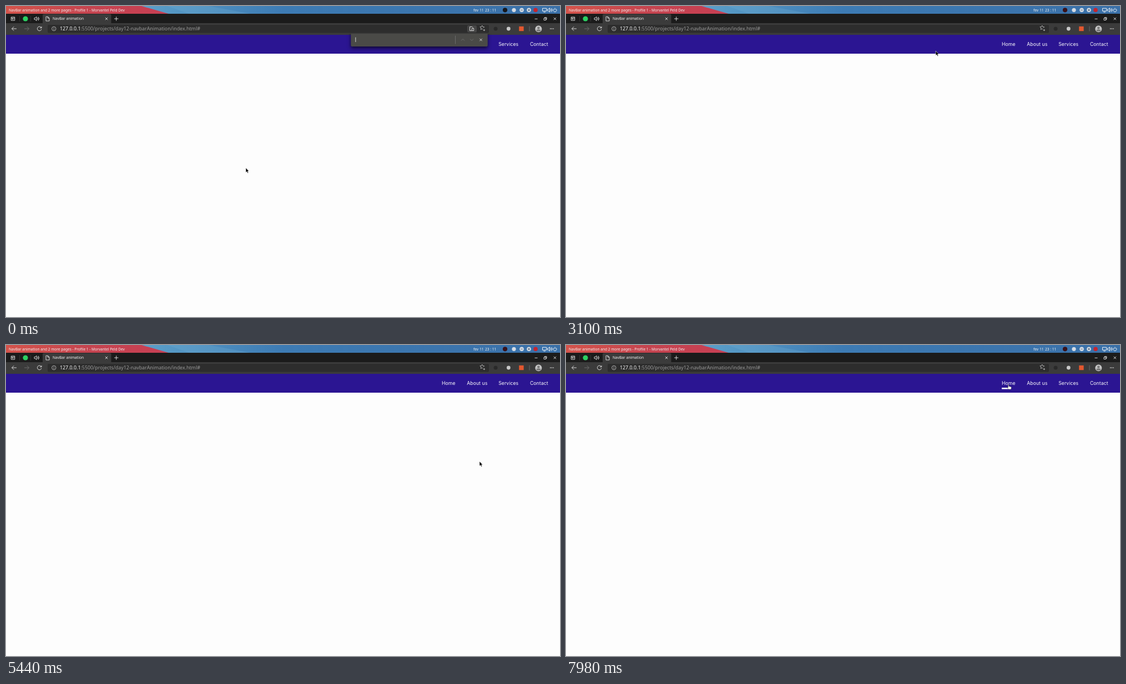
Animation of 998 by 561 pixels, one loop 8 s. Source, as an HTML page:

```html
<!DOCTYPE html>
<html lang="en">
<head>
<meta charset="utf-8">
<title>NavBar animation</title>
<style>
  html, body { margin: 0; width: 100%; height: 100%; overflow: hidden; background: #fdfdfd; }
  svg { display: block; width: 100vw; height: 100vh; }
  text { font: 6.6px "Noto Sans", sans-serif; fill: #f2f2f2; white-space: pre; }
  .url { font-size: 8.85px; fill: #9a9a9a; }
  .nav text { font: 8.6px Inter, sans-serif; letter-spacing: .1px; fill: #fff; text-anchor: middle; }
  .line { fill: none; stroke: #e6e6e6; stroke-width: .9; }
  .soft { stroke: #bbb; }
  .dim { stroke: #707070; }

  /* every part shares one 8 s loop */
  .pointer, .arrow, .hand, .underline, .find-bar, .find-button, .recorder {
    animation: 8s linear infinite;
  }
  .pointer { animation-name: wander; animation-timing-function: ease-in-out; }
  .arrow { animation-name: leave-page; animation-timing-function: step-end; }
  .hand { animation-name: reach-link; animation-timing-function: step-end; }
  .underline { animation-name: grow; }
  .find-bar { animation-name: close; filter: drop-shadow(0 3px 3px #000a); }
  .find-button { animation-name: vanish; animation-timing-function: step-end; }
  .recorder { animation-name: record; animation-timing-function: step-end; }

  @keyframes wander {
    0%, 21% { transform: translate(432px, 292px); animation-timing-function: ease-in; }
    24% { transform: translate(600px, 335px); animation-timing-function: linear; }
    27.75% { transform: translate(799px, 259px); animation-timing-function: ease-out; }
    31.5% { transform: translate(918px, 120px); }
    38.75%, 40% { transform: translate(666px, 81px); }
    48% { transform: translate(940px, 198px); }
    55.75% { transform: translate(718px, 88px); }
    63% { transform: translate(921px, 232px); }
    68% { transform: translate(853px, 210px); }
    73% { transform: translate(894px, 179px); }
    80.75%, 82.25% { transform: translate(804px, 117px); }
    99.75%, 100% { transform: translate(797px, 71px); }
  }
  @keyframes leave-page { 0% { opacity: 1; } 97%, 100% { opacity: 0; } }
  @keyframes reach-link { 0% { opacity: 0; } 97%, 100% { opacity: 1; } }
  @keyframes grow { 0%, 97% { width: 0; } 100% { width: 18px; } }
  @keyframes close {
    0%, .75% { transform: none; animation-timing-function: ease-in; }
    3.25%, 100% { transform: translateY(-50px); }
  }
  @keyframes vanish { 0% { opacity: 1; } 3.25%, 100% { opacity: 0; } }
  @keyframes record { 0% { fill: #17171b; } 3.75%, 100% { fill: #3b1218; } }
</style>
</head>
<body>
<svg viewBox="0 0 998 561" preserveAspectRatio="none">
  <defs>
    <linearGradient id="sky">
      <stop offset=".25" stop-color="#5b9fc9"/>
      <stop offset=".5" stop-color="#3d7bb4"/>
      <stop offset="1" stop-color="#3a70a8"/>
    </linearGradient>
    <linearGradient id="coral">
      <stop stop-color="#d4534b"/>
      <stop offset=".5" stop-color="#c5444f"/>
      <stop offset="1" stop-color="#c83f54"/>
    </linearGradient>
    <clipPath id="below"><rect x="600" y="50" width="300" height="50"/></clipPath>
    <path id="cross" d="M-2.2-2.2l4.4 4.4m0-4.4l-4.4 4.4"/>
    <path id="speaker" d="M-4-1.5h1.7L0-3.6v7.2l-2.3-2.1H-4zM1.8-2q1.6 2 0 4M3.2-3.3q2.8 3.3 0 6.6"/>
    <path id="shaft" d="M4.3 0h-8.5m3.7-3.7L-4.2 0l3.7 3.7"/>
    <path id="chevron" d="M-3 1.5l3-3 3 3"/>
  </defs>

  <!-- page navigation -->
  <rect y="52" width="998" height="34" fill="#2b1592"/>
  <g class="nav">
    <text x="797.3" y="72">Home</text>
    <text x="848.8" y="72">About us</text>
    <text x="905.2" y="72">Services</text>
    <text x="960.3" y="72">Contact</text>
  </g>
  <rect class="underline" x="785" y="77" height="2.6" fill="#fff"/>

  <!-- desktop panel -->
  <rect width="998" height="14" fill="url(#sky)"/>
  <path d="M290 0h75l75 14H330Z" fill="#75afd1" opacity=".25"/>
  <path d="M0 0H244L293 14H0Z" fill="url(#coral)"/>
  <text x="5" y="9.6" style="font-size:6.55px">NavBar animation and 2 more pages - Profile 1 - Morvantel Peld Dev</text>
  <text x="842" y="9.8">fev 11</text>
  <text x="863" y="9.8">23 : 11</text>
  <circle class="recorder" cx="899" cy="7.3" r="4.1"/>
  <g fill="#d5dce4">
    <circle cx="915" cy="7.3" r="3.6"/>
    <circle cx="929" cy="7.3" r="3.8"/>
    <circle cx="942" cy="7.3" r="3.8"/>
    <circle cx="954" cy="7.3" r="3.8" fill="#c6252f"/>
  </g>
  <path d="M927 7.3h4" stroke="#64798f"/>
  <rect x="940.5" y="5.8" width="3" height="3" fill="#64798f"/>
  <g class="line" style="stroke:#fff">
    <path d="M966.5 4.2h7v5h-7zM968.3 11h3.4"/>
    <use href="#speaker" x="979.5" y="7.3"/>
    <path d="M987.2 5a3 3 0 1 0 3.4 0M988.9 3.6v3.4"/>
  </g>

  <!-- tab strip -->
  <rect y="14" width="998" height="17" fill="#1b1b1b"/>
  <rect x="66" y="14.5" width="123.5" height="20" rx="2.5" fill="#3b3b3b"/>
  <path d="M24.5 18v10M44.5 18v10" stroke="#444" stroke-width=".6"/>
  <circle cx="35" cy="23" r="4.6" fill="#2bcf62"/>
  <text x="84" y="25.4">NavBar animation</text>
  <g class="line">
    <path d="M9.3 20h6.4v6H9.3zM9.3 22h6.4M11.5 22v2h2"/>
    <use href="#speaker" x="55" y="23"/>
    <path d="M72 19.3h3.5l2.5 2.5v5.2h-6zM75.3 19.3v2.7H78"/>
    <use href="#cross" x="181" y="23"/>
    <path d="M195 23h7.4m-3.7-3.7v7.4"/>
    <path d="M952.5 23.3h5M969 22h3.7v3.5H969zM970.3 22v-1.3h3.6v3.5h-1.2"/>
    <use href="#cross" x="988.8" y="23"/>
  </g>

  <!-- toolbar -->
  <rect y="31" width="998" height="21" fill="#3b3b3b"/>
  <rect x="75" y="34" width="795" height="14.5" rx="2" fill="#2d2d2d"/>
  <text class="url" x="97" y="44.2"><tspan fill="#f4f4f4">127.0.0.1</tspan>:5500/projects/day12-navbarAnimation/index.html#</text>
  <g class="line">
    <use href="#shaft" x="14.7" y="41"/>
    <use href="#shaft" class="dim" transform="translate(37.3 41) scale(-1 1)"/>
    <path d="M63.6 39.2a3.8 3.8 0 1 0 .3 2.6M64 37v2.6h-2.7"/>
    <g class="soft">
      <circle cx="86.3" cy="41" r="3.7"/>
      <path d="M86.3 40.4v2.8M86.3 38.5v1"/>
      <path d="M859 42l-1.3-.8-2.4 1.2.5-2.8-2-1.8 2.6-.3 1.3-2.4 1.2 2.4 2.7.4-1.7 1.7M859.5 43.5h3.6m-1.8-1.8v3.6"/>
    </g>
    <path class="dim" d="M943 36.5v9"/>
  </g>
  <circle cx="882" cy="41" r="3.5" fill="#292929"/>
  <circle cx="905.3" cy="41" r="3.4" fill="#c9c9c9"/>
  <rect x="924.2" y="36.8" width="8.4" height="8.4" fill="#e2572f"/>
  <circle cx="959.3" cy="41.3" r="6" fill="#c4c4c4"/>
  <circle cx="959.3" cy="39.6" r="2.2" fill="#777"/>
  <ellipse cx="959.3" cy="44" rx="4" ry="1.8" fill="#777"/>
  <path d="M980 41h7" class="line" stroke-dasharray="1.3 1.4" style="stroke-width:1.3"/>

  <!-- find bar and its toolbar button -->
  <g class="find-button">
    <rect x="831" y="35" width="17" height="12.5" rx="2" fill="#464646"/>
    <path class="line" d="M839 44.5h-3.5v-7h4l2 2M839.3 40.5h3.3v4h-3.3z"/>
  </g>
  <g clip-path="url(#below)">
    <g class="find-bar">
      <rect x="621.3" y="45" width="246.4" height="28" rx="2" fill="#4a4a47"/>
      <g class="line">
        <path d="M629.8 56.5v8.5"/>
        <use href="#cross" x="855.5" y="61"/>
        <g class="dim">
          <path d="M809.5 53.5v15"/>
          <use href="#chevron" x="823" y="61"/>
          <use href="#chevron" transform="translate(839 61) scale(1 -1)"/>
        </g>
      </g>
    </g>
  </g>

  <g class="pointer" stroke-width=".5">
    <path class="arrow" d="M0 0V8.3L1.9 6.6 3.2 9.4 4.6 8.7 3.3 6H5.6Z" fill="#000" stroke="#fff"/>
    <path class="hand" d="M-.7 .6Q0-.4 .7 .6V3.4L4.8 4.4Q5.8 4.8 4.8 9H.3L-2.2 6.2Q-2 5-.7 6Z" fill="#fff" stroke="#222"/>
  </g>
</svg>
</body>
</html>
```
